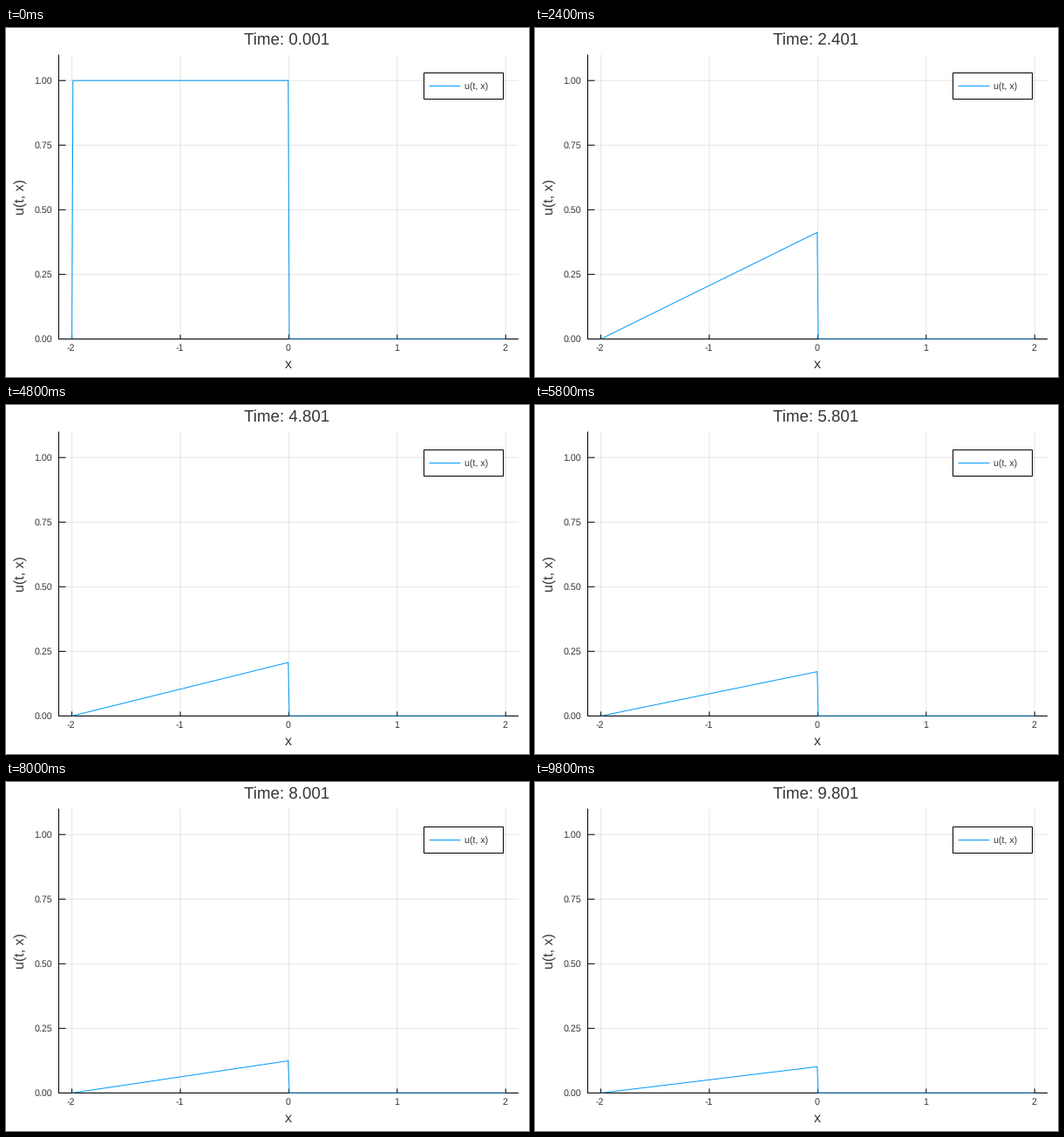
Write a matplotlib script that moves like this. It is 600x400 px and loops after 10000 ms.

```python
import numpy as np
import matplotlib.pyplot as plt
from matplotlib.animation import FuncAnimation
from matplotlib.patches import Rectangle

W, H, DPI = 600, 400, 100
FRAMES, INTERVAL = 50, 200
BLUE, INK = "#009AFA", "#363636"
LEFT, RIGHT, TOP, BOTTOM = 60.5, 588.0, 30.5, 356.4
PT = 72 / DPI  # points per pixel

plt.rcParams["font.family"] = "Liberation Sans"
plt.rcParams["text.hinting"] = "none"
plt.rcParams["path.snap"] = False


def px(x):
    return 324.4 + 124.4 * x


def py(u):
    return BOTTOM - 296.2 * u


def solve(x, dt=0.002, steps=100):
    """Upwind steps of u_t + 2 u u_x = 0 from a box; one profile per frame."""
    ratio = 2 * dt / (x[1] - x[0])
    u = np.where((x > -2) & (x < 0), 1.0, 0.0)
    profiles = []
    for _ in range(FRAMES):
        profiles.append(u.copy())
        for _ in range(steps):
            u[1:] -= ratio * u[1:] * (u[1:] - u[:-1])
    return profiles


fig = plt.figure(figsize=(W / DPI, H / DPI), dpi=DPI, facecolor="white")
ax = fig.add_axes([0, 0, 1, 1])
ax.set_xlim(0, W)
ax.set_ylim(H, 0)
ax.axis("off")


def line(x0, y0, x1, y1, color="black", z=2, **kw):
    ax.plot([x0, x1], [y0, y1], color=color, lw=PT, zorder=z,
            solid_capstyle="butt", **kw)


def label(x, y, text, size, ha="center", **kw):
    return ax.text(x, y, text, fontsize=size * PT, color=INK, ha=ha,
                   va="baseline", zorder=6, **kw)


# Grid, ticks and tick labels
for v in range(-2, 3):
    x = px(v)
    line(x, TOP, x, BOTTOM, z=1, alpha=0.1)
    line(x, BOTTOM, x, BOTTOM - 5)
    label(x - (1.2 if v < 0 else 0.4), 370, str(v), 10.67)
for v in np.arange(0, 1.01, 0.25):
    y = py(v)
    if v > 0:
        line(LEFT, y, RIGHT, y, z=1, alpha=0.1)
        line(LEFT, y, LEFT + 8, y)
    label(53, y + 3.8, f"{v:.2f}", 10.67, ha="right")

# Axes; the translucent copy darkens the curve where it lies on the axis
line(LEFT, TOP, LEFT, BOTTOM + 0.5)
line(LEFT, BOTTOM, RIGHT, BOTTOM)
line(LEFT, BOTTOM, RIGHT, BOTTOM, z=4, alpha=0.4)

# Axis names and legend
label(324.2, 390, "x", 16)
label(21, 194, "u(t, x)", 16, rotation=90, rotation_mode="anchor")
ax.add_patch(Rectangle((479.5, 51.5), 91, 30, facecolor="white",
                       edgecolor="black", lw=PT, zorder=5))
line(485.5, 66.5, 521.5, 66.5, color=BLUE, z=6)
label(526.3, 70.5, "u(t, x)", 10.67, ha="left")

xs = np.linspace(-2, 2, 400)
profiles = solve(xs)
curve, = ax.plot(px(xs), py(profiles[0]), color=BLUE, lw=PT, zorder=3,
                 solid_joinstyle="round", solid_capstyle="butt")
title = label(322.5, 18.4, "Time: 0.001", 18.8)


def update(i):
    curve.set_ydata(py(profiles[i]))
    title.set_text(f"Time: {0.001 + 0.2 * i:.3f}")
    return curve, title


anim = FuncAnimation(fig, update, frames=FRAMES, interval=INTERVAL,
                     repeat=True, repeat_delay=0)
plt.show()
```
